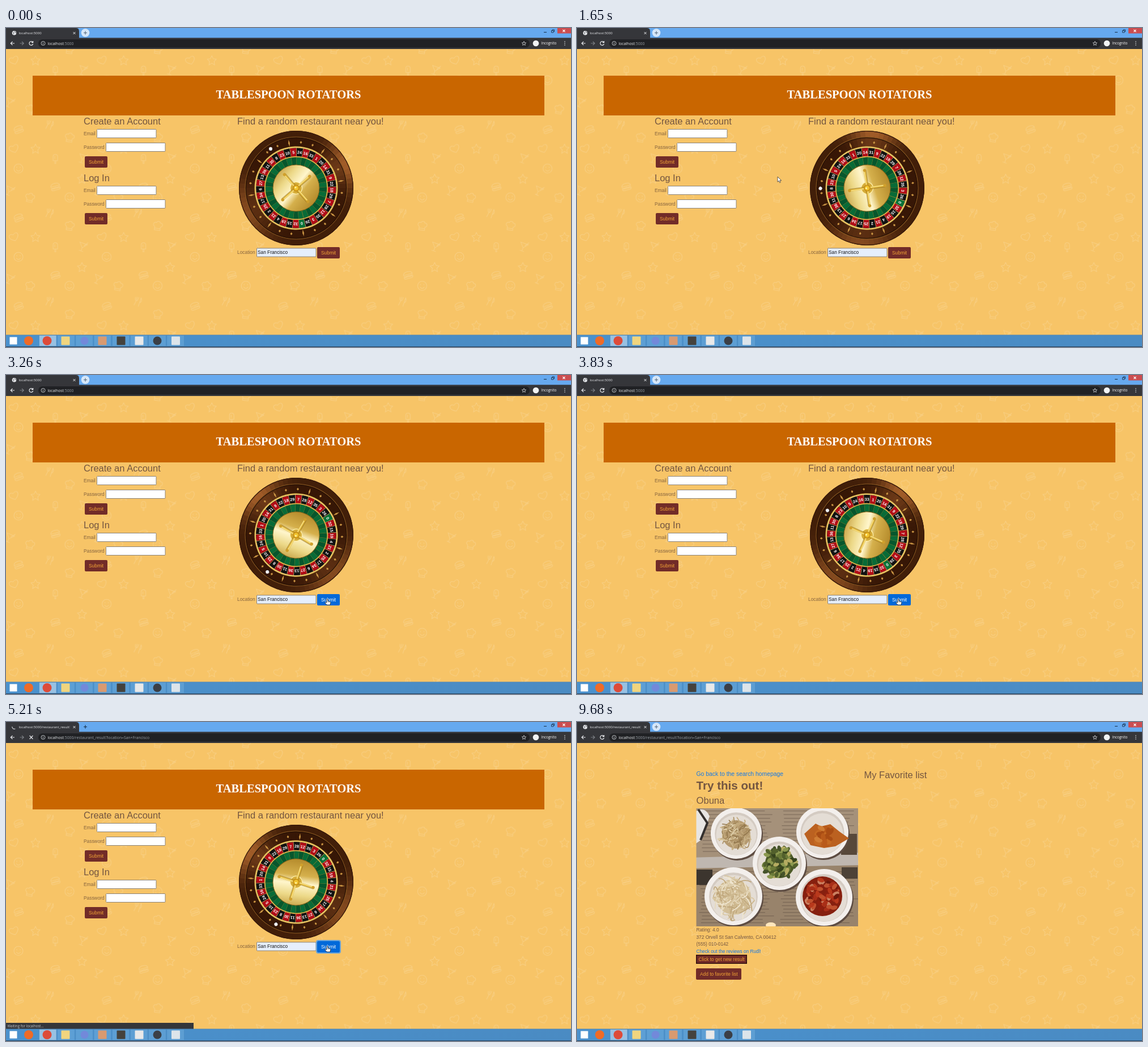
These frames come from a looping animation (997 px wide and 562 px high, 9.78 s). An HTML page:

```html
<!DOCTYPE html>
<html lang="en">
<head>
<meta charset="utf-8">
<title>Restaurant picker</title>
<style>
html, body { margin: 0; width: 100%; height: 100%; overflow: hidden; background: #f7c467; }
svg { display: block; width: 100vw; height: 100vh; }
text { font-family: "Liberation Sans", Arial, sans-serif; white-space: pre; }
.ui { font-family: "Open Sans", "Noto Sans", sans-serif; }
.serif { font-family: "Liberation Serif", "Times New Roman", serif; }
</style>
</head>
<body>
<svg id="stage" viewBox="0 0 997 562" preserveAspectRatio="none"></svg>
<script>
const LOOP = 9780, CX = 512, CY = 282;
const BROWN = '#735540', LABEL = '#86643f', MAROON = '#722c28', AMBER = '#f3a536', LINK = '#1479e8', BLUE = '#0069d9';

// ---------- drawing helpers ----------
const text = (x, y, s, size, fill, extra = '') => `<text x="${x}" y="${y}" font-size="${size}" fill="${fill}" ${extra}>${s}</text>`;
const rect = (x, y, w, h, fill, extra = '') => `<rect x="${x}" y="${y}" width="${w}" height="${h}" fill="${fill}" ${extra}/>`;
const circle = (x, y, r, fill, extra = '') => `<circle cx="${x}" cy="${y}" r="${r}" fill="${fill}" ${extra}/>`;
const line = (d, stroke, w = 1, extra = '') => `<path d="${d}" fill="none" stroke="${stroke}" stroke-width="${w}" ${extra}/>`;
const group = (id, body, extra = '') => `<g id="${id}" ${extra}>${body}</g>`;
const range = n => [...Array(n).keys()];
const polar = (r, deg) => {
  const a = deg * Math.PI / 180;
  return [r * Math.sin(a), -r * Math.cos(a)].map(v => +v.toFixed(2));
};
const wedge = (r0, r1, a0, a1, fill) => {
  const p = [[r1, a0], [r1, a1], [r0, a1], [r0, a0]].map(q => polar(...q));
  return `<path d="M${p[0]}A${r1} ${r1} 0 0 1 ${p[1]}L${p[2]}A${r0} ${r0} 0 0 0 ${p[3]}Z" fill="${fill}"/>`;
};
const field = (x, y, fill = '#fff') => rect(x + .5, y + .5, 104.5, 15, fill, 'stroke="#8d8478" rx="1"');
const button = (x, y, w, label, id) =>
  rect(x, y, w, 20, MAROON, `rx="2" id="${id}"`) + text(x + 7, y + 12.8, label, 8.4, AMBER, `id="${id}Text"`);
let seed = 7;
const rand = () => (seed = seed * 16807 % 2147483647) / 2147483647;
const pick = list => list[rand() * list.length | 0];

// ---------- wallpaper ----------
function wallpaper() {
  const art = {
    heart: 'M0 7C-14-1-7-10 0-4C7-10 14-1 0 7Z',
    star: 'M0-8L2.5-3L8-2L4 2L5 8L0 5L-5 8L-4 2L-8-2L-2.5-3Z',
    face: 'M8 0A8 8 0 1 1-8 0A8 8 0 1 1 8 0M-4 2Q0 7 4 2M-3-3V-1M3-3V-1',
    hat: 'M-5 7V1C-11-2-6-8-3-6C-1-10 4-9 4-6C10-7 9 1 5 1V7ZM-5 4H5',
    fork: 'M-4 8L-2-1M-5-7L-4-2Q-2 0 0-2L1-8M-2-8V-2M4 8L5-8Q9-3 5 1',
    burger: 'M-8-1Q-7-6 0-6Q8-6 8-1ZM-8 1Q-4 3 0 1Q4 3 8 1M-8 3H8Q8 6 5 6H-5Q-8 6-8 3Z',
    drink: 'M-7-6H7L0 2ZM0 2V8M-4 8H4M2-2L7-10',
    pop: 'M-4 3V-4Q-4-8 0-8Q4-8 4-4V3ZM-1 3V8H1V3M-1-5V0'
  };
  const spots = [['heart', 14, 57, -20], ['star', 52, 57, 0], ['face', 22, 92, 0], ['fork', 76, 15, 15],
    ['burger', 87, 124, -15], ['hat', 42, 144, 10], ['drink', 135, 74, 20], ['drink', 6, 131, 25],
    ['face', 112, 143, 0], ['hat', 112, 38, 8], ['star', 134, 110, 0], ['pop', 87, 75, 0],
    ['burger', 22, 23, -20]];
  const icons = spots.map(([k, x, y, a]) => `<path d="${art[k]}" transform="translate(${x} ${y}) rotate(${a})"/>`).join('');
  return `<pattern id="paper" width="155.6" height="155.6" patternUnits="userSpaceOnUse">
    ${rect(0, 0, 156, 156, '#f7c467')}<g fill="none" stroke="#f9d084" stroke-width="1">${icons}</g></pattern>`;
}

// ---------- roulette wheel ----------
function wheel() {
  const order = [0, 32, 15, 19, 4, 21, 2, 25, 17, 34, 6, 27, 13, 36, 11, 30, 8, 23, 10, 5, 24, 16, 33,
    1, 20, 14, 31, 9, 22, 18, 29, 7, 28, 12, 35, 3, 26];
  const step = 360 / 37, first = 170.9;
  const shine = a => {
    const c = Math.cos((a - 64) * Math.PI / 180);
    return c > 0 ? c ** 10 : .7 * c ** 6;
  };
  const wood = (r0, r1, dark, gain) => range(72).map(i => {
    const s = shine(i * 5 + 2.5) * gain;
    return wedge(r0, r1, i * 5, i * 5 + 5.3, `rgb(${dark[0] + 95 * s | 0},${dark[1] + 62 * s | 0},${dark[2] + 32 * s | 0})`);
  }).join('');
  const ring = (r, c, w) => circle(0, 0, r, 'none', `stroke="${c}" stroke-width="${w}"`);
  let s = circle(0, 0, 101, '#2b1206') + wood(89, 100.5, [66, 31, 9], 1) + wood(72, 90, [55, 23, 6], .55);
  s += ring(100.3, '#38190a', 1.2) + ring(90, '#8c5a22', 1) + ring(88.6, '#241005', 1);
  s += circle(0, 0, 73.5, '#e3bd55') + circle(0, 0, 71.3, '#261708');
  order.forEach((n, i) => {
    const a = first + i * step, fill = n ? (i % 2 ? '#b20d17' : '#121212') : '#087238';
    s += wedge(56, 70.5, a - step / 2 + .35, a + step / 2 - .35, fill);
    s += wedge(40, 54.5, a - step / 2, a + step / 2 + .2, i % 2 ? '#06572d' : '#086b37');
    s += line(`M${polar(56, a + step / 2)}L${polar(71, a + step / 2)}`, '#e8cf82', .7);
    s += line(`M${polar(41, a + step / 2)}L${polar(54, a + step / 2)}`, '#a08a32', .7);
    s += text(0, -60.6, n, 7.2, '#fff', `text-anchor="middle" font-weight="bold" transform="rotate(${a})"`);
  });
  s += ring(55.2, '#e0b84c', 1.8) + ring(71.3, '#f0d27a', 1);
  s += circle(0, 0, 41, 'url(#gold)', 'stroke="#80601a" stroke-width="1"');
  range(8).forEach(k => {
    const c = k * 45 - 31.5;
    s += `<path d="M0-86L1.5-80L0-74L-1.5-80Z" fill="#c99443" transform="rotate(${c + 22.5})"/>`;
    [-7.5, 7.5].forEach(d => s += `<path d="M0-83.5L2-81L0-78.5L-2-81Z" fill="#c99443" transform="rotate(${c + d})"/>`);
  });
  s += circle(0, 0, 10.5, '#d5ac3a', 'stroke="#fff0aa" stroke-width="1.2"');
  range(4).forEach(k => {
    s += `<g transform="rotate(${k * 90 - 41})">` +
      line('M1.5 0V-31', '#8a6514', 3, 'stroke-linecap="round" opacity=".55"') +
      line('M0 0V-31', '#e2b93c', 3.6, 'stroke-linecap="round"') +
      line('M-.6-5V-30', '#fff0a8', 1) + circle(0, -31.5, 2.7, '#d0a02c') + '</g>';
  });
  s += circle(0, 0, 6, '#c99217') + circle(0, 0, 4, '#f0c22d') + circle(-1, -1, 1.6, '#fff2a0');
  const [bx, by] = polar(82.4, -33.1);
  return s + circle(bx + .8, by + .8, 3.3, '#1d0d05') + circle(bx, by, 3.1, '#e8e8ec') + circle(bx - .7, by - .8, 1.4, '#fff');
}

// ---------- pages ----------
function form(title, y, id) {
  return text(137, y + 6, title, 16.5, BROWN) + text(137, y + 24.8, 'Email', 8.4, LABEL) + field(160, y + 14) +
    text(137, y + 48.6, 'Password', 8.4, LABEL) + field(176, y + 38) + button(139, y + 62, 40, 'Submit', id);
}

function homePage() {
  return rect(47, 84, 903, 70, '#c96600') +
    text(498.5, 124, 'TABLESPOON ROTATORS', 20.56, '#fff', 'class="serif" font-weight="bold" text-anchor="middle"') +
    form('Create an Account', 164, 'join') + form('Log In', 264, 'login') +
    text(408, 170, 'Find a random restaurant near you!', 16.5, BROWN) +
    group('wheel', wheel()) +
    text(408, 398, 'Location', 8.4, LABEL) + field(442, 387.5, '#e6effd') +
    text(444, 398.3, 'San Francisco', 8.3, '#111') +
    rect(548, 385, 42, 22, 'none', 'id="ring" rx="3" stroke="#6ba4d8" stroke-width="2"') +
    button(549, 386, 40, 'Submit', 'search');
}

function photo() {
  let s = rect(200, 142, 306, 228, '#98836b');
  s += '<path d="M200 142H506V232L200 241Z" fill="#a5917a"/><path d="M200 239L506 230V252L200 258Z" fill="#bfb7b0"/>';
  range(28).forEach(i => {
    const y = i < 12 ? 156 + i * 6.5 : 263 + (i - 12) * 6;
    range(4).forEach(c => s += rect(214 + c * 72 + rand() * 8, y, 38 + rand() * 24, 1.2, '#5d4c40', 'opacity=".5"'));
  });
  s += rect(211, 260, 28, 27, '#3c352e') + rect(466, 197, 28, 37, '#57483a') + rect(467, 256, 28, 20, '#4d4237');
  s += '<path d="M210 157Q226 148 234 166L220 207L210 214Z" fill="#e7e5e3"/><path d="M214 154L230 178L218 208" fill="none" stroke="#34302e" stroke-width="4"/>';

  const bowl = (x, y, r) => circle(x + 2, y + 3, r, '#5d4c42') + circle(x, y, r, '#f3efec') +
    circle(x, y + 1, r * .84, '#d4cbc2') + circle(x, y + 3, r * .79, '#e4ddd5');
  const scatter = (x, y, r, n, draw) => range(n).map(() => {
    const [dx, dy] = polar(r * Math.sqrt(rand()), rand() * 360);
    return draw(x + dx, y + dy);
  }).join('');
  const strands = (x, y, r, base, colors, n, len) => circle(x, y, r, base) + scatter(x, y, r, n, (px, py) => {
    const [ex, ey] = polar(len, rand() * 360), [kx, ky] = polar(len * .6, rand() * 360);
    return line(`M${px - ex / 2} ${py - ey / 2}q${kx} ${ky} ${ex} ${ey}`, pick(colors), 1.7, 'stroke-linecap="round"');
  });
  const chunks = (x, y, r, colors, n, size) => scatter(x, y, r, n, (px, py) =>
    `<ellipse cx="${px}" cy="${py}" rx="${size}" ry="${size * .6}" fill="${pick(colors)}" transform="rotate(${rand() * 180} ${px} ${py})"/>`);

  s += bowl(281, 196, 45) + strands(281, 198, 25, '#b59a70', ['#cdb88f', '#dfcfab', '#94794f', '#c3aa7d', '#a98d60'], 75, 15);
  s += bowl(433, 194, 46) + '<path d="M401 197L421 179L431 184L447 180L463 193L480 205L456 219L436 222L412 217Z" fill="#bb6120"/>' +
    chunks(435, 201, 16, ['#cf7c34', '#a94d14', '#c46a22', '#b95a1a'], 22, 7);
  s += bowl(357, 249, 47) + circle(358, 249, 26, '#4d5a28') +
    chunks(357, 249, 29, ['#52602c', '#6b7a38', '#36431d', '#8b984f', '#45532a', '#b5ac62'], 90, 5.5);
  s += bowl(276, 307, 51) + strands(276, 308, 31, '#d3bf98', ['#e6d9bd', '#f0e6d0', '#bea57a', '#d9c7a2', '#cbb58b'], 80, 26);
  s += bowl(436, 309, 50) + circle(433, 307, 35, '#86200f') +
    chunks(433, 307, 29, ['#a92f18', '#8f1f0f', '#c0512e', '#6d170b', '#b8391c', '#cb8060'], 70, 6);
  s += '<ellipse cx="342" cy="358" rx="9" ry="5" fill="#ffe7bd"/>';
  return `<g clip-path="url(#photoClip)"><g filter="url(#soft)">${s}</g></g>`;
}

function resultPage() {
  return text(210.5, 95, 'Go back to the search homepage', 10.4, LINK) +
    text(210.5, 119, 'Try this out!', 20.6, BROWN, 'font-weight="bold"') +
    text(210.5, 144, 'Obuna', 16.6, BROWN) + text(506.5, 99, 'My Favorite list', 16.5, BROWN) + photo() +
    text(210.5, 369, 'Rating: 4.0', 8.3, BROWN) +
    text(210.5, 381.5, '372 Orvell St San Calvento, CA 00412', 8.3, BROWN) +
    text(210.5, 394, '(555) 010-0142', 8.3, BROWN) +
    text(210.5, 406.5, 'Check out the reviews on Rudl!', 8.25, LINK) +
    rect(210.7, 410.7, 88.6, 14.6, MAROON, 'stroke="#2b0d0c" stroke-width="1.4"') +
    text(214.5, 420.6, 'Click to get new result', 8.3, AMBER) + button(210, 434, 80, 'Add to favorite list', 'add');
}

// ---------- browser and desktop ----------
function browser() {
  const white = '#e8eaed', ui = 'class="ui"';
  return rect(0, 0, 997, 18, '#66a9ef') + '<path d="M0 0H124Q129 0 129 6V18H0Z" fill="#35363a"/>' + rect(0, 17.3, 997, 19.7, '#35363a') +
    rect(57, 20, 867, 14.5, '#202124', 'rx="7.2"') +
    group('globe', circle(14.5, 8.8, 3.8, white) + line('M12 7L14 8.5L13 11M15 5.5L16.5 8L18 9', '#55585d', 1)) +
    line('M14.5 5A4 4 0 0 0 11.5 11', '#d7dade', 1.2, 'id="spinner"') +
    `<g clip-path="url(#tabClip)">${text(22.5, 11, '', 5.95, white, `${ui} id="tabTitle"`)}</g>` +
    line('M118.5 7L122.5 11M122.5 7L118.5 11', white, 1) +
    circle(140, 8.5, 7.3, '#d6e7f9', 'id="plusDisc"') + line('M137 8.5H143M140 5.5V11.5', '#fff', 1.2, 'id="plus"') +
    line('M15 27H8.5M11.5 23.8L8.3 27L11.5 30.2', white, 1.2) + line('M24.5 27H31M28 23.8L31.2 27L28 30.2', '#7d8085', 1.2) +
    line('M47 24.8A3.4 3.4 0 1 0 47.7 28M47.7 23V25.6H45', white, 1.2, 'id="reload"') +
    line('M41.6 24L47.4 30M47.4 24L41.6 30', white, 1.2, 'id="stop"') +
    circle(65.5, 27, 3.5, 'none', 'stroke="#cfd2d6" stroke-width=".9"') + line('M65.5 26.5V29M65.5 24.9V25.7', '#cfd2d6', .9) +
    `<text x="73.5" y="29.5" font-size="6.8" fill="#e8eaed" ${ui}>localhost<tspan id="url" fill="#9aa0a6"></tspan></text>` +
    '<path d="M914 23.5L915 26L917.7 26.1L915.6 27.8L916.3 30.4L914 29L911.7 30.4L912.4 27.8L910.3 26.1L913 26Z" fill="none" stroke="#dadce0" stroke-width=".8"/>' +
    circle(935, 27, 5.3, '#f1f3f4') + text(944.5, 29.2, 'Incognito', 6.2, '#fff', ui) +
    [24, 27, 30].map(y => circle(986, y, .8, white)).join('') +
    line('M949 7.5H954', '#1c3550', 1.1) + line('M962.5 4.5H966V8H962.5ZM964 4V3H967.5V6.5H966.5', '#1c3550', .9) +
    rect(973, 0, 24, 9.5, '#cb4d50') + line('M982.5 3L986.5 7M986.5 3L982.5 7', '#fff', 1.1);
}

function taskbar() {
  const square = (x, c) => rect(x - 7.5, 543.5, 15, 15, c, 'rx="1"');
  let s = rect(0, 541, 997, 21, 'url(#bar)') + rect(0, 540.5, 997, .8, '#4f86b3') + rect(0, 561, 997, 1, '#24425e');
  range(8).forEach(i => s += rect(58.5 + i * 32.2, 541.5, 30.5, 19, i ? '#76b2e0' : '#c2dcef', `opacity="${i ? .45 : .65}" stroke="#4a83b5" stroke-width=".6"`));
  return s + rect(6.5, 544.5, 13, 13, '#fff') + circle(40, 551, 8, '#ef6b27') + circle(72.5, 551, 8, '#dd4b39') +
    square(105, '#f1d57e') + circle(138.5, 551, 7, '#7289da') + square(170, '#d99a70') + square(203, '#45423d') +
    square(235, '#e9e9e9') + circle(267, 551, 7.5, '#3b3f46') + square(299.5, '#dce4ea');
}

const arrow = '<path d="M0 0V9.2L2.2 7.2L3.7 10.5L5.2 9.8L3.8 6.7H6.7Z" fill="#fff" stroke="#222" stroke-width=".7"/>';
const hand = '<path d="M-1 .8Q0-.6 1 .8V4L5 5Q6 5.4 5.7 7L5 10.5H-1L-4 6.8Q-3.6 5-1.2 6.6Z" fill="#fff" stroke="#222" stroke-width=".8"/>' +
  line('M1 4V6.4M3 4.6V6.6', '#444', .5);

const stage = document.getElementById('stage');
stage.innerHTML = `<defs>${wallpaper()}
  <linearGradient id="gold" x1="0" y1=".1" x2="1" y2=".9"><stop offset="0" stop-color="#b98e2e"/><stop offset=".28" stop-color="#ecd887"/>
    <stop offset=".48" stop-color="#fff6cc"/><stop offset=".62" stop-color="#d5b04c"/><stop offset="1" stop-color="#a87c1e"/></linearGradient>
  <linearGradient id="bar" x1="0" y1="0" x2="1" y2="0"><stop offset="0" stop-color="#4a91cd"/><stop offset="1" stop-color="#4a8bc3"/></linearGradient>
  <filter id="soft"><feGaussianBlur stdDeviation=".7"/></filter>
  <clipPath id="tabClip">${rect(20, 0, 93, 18, '#fff')}</clipPath>
  <clipPath id="photoClip">${rect(210.5, 152, 285.5, 208, '#fff')}</clipPath></defs>
  ${rect(0, 37, 997, 504, 'url(#paper)')}${group('home', homePage())}${group('result', resultPage())}
  ${group('status', rect(0, 530, 331, 11, '#35363a') + text(2.5, 537.8, '', 6.2, '#c5c8cc', 'class="ui" id="statusText"'))}
  ${browser()}${taskbar()}${group('cursor', group('arrow', arrow) + group('hand', hand))}`;

// ---------- timeline ----------
const steps = [[0, 0, 1], [150, 150, 1], [370, 1250, 11], [1360, 1650, 4], [1740, 2310, 7], [2400, 3260, 10],
  [3350, 3350, 1], [3450, 4320, 10], [4440, 4440, 1], [4550, 4890, 5], [5050, 5210, 3], [5320, 5560, 4],
  [5750, 5850, 2], [7250, 7740, 6], [7880, 7910, 2], [8720, 9080, 5], [9680, 9680, 1]]
  .flatMap(([a, b, n]) => range(n).map(i => n > 1 ? Math.round(a + (b - a) * i / (n - 1)) : a));
const spin = [[0, 0], [1650, 302.7], [3260, 611.1], [4440, 817], [5210, 958.7], [5600, 1030]];
const moves = [[150, 62, 547], [370, 52, 505], [700, 95, 425], [1250, 279, 302], [1650, 354, 262], [2000, 425, 345],
  [2310, 510, 434], [2650, 545, 430], [3100, 567, 394.5], [7240, 567, 394.5], [7250, 551, 398.5], [7740, 324, 451],
  [7880, 316, 448], [7910, 309, 447], [8710, 309, 447], [8720, 290, 443], [8990, 180, 436]];

function along(keys, t) {
  const i = keys.findIndex(k => k[0] > t);
  if (i === 0) return keys[0].slice(1);
  if (i < 0) return keys[keys.length - 1].slice(1);
  const a = keys[i - 1], b = keys[i], f = (t - a[0]) / (b[0] - a[0]);
  return a.slice(1).map((v, k) => v + (b[k + 1] - v) * f);
}

const el = Object.fromEntries([...stage.querySelectorAll('[id]')].map(e => [e.id, e]));
const show = (id, on) => el[id].setAttribute('display', on ? 'inline' : 'none');
const attr = (id, name, v) => el[id].setAttribute(name, v);
const paint = (id, on) => {
  attr(id, 'fill', on ? BLUE : MAROON);
  attr(id + 'Text', 'fill', on ? '#fff' : AMBER);
};

function render(time) {
  const t = steps.filter(s => s <= time).pop();
  const clicked = t >= 3920, loading = clicked && t < 5560, moved = t >= 4720, done = t >= 5480;
  show('home', !done);
  show('result', done);
  attr('wheel', 'transform', `translate(${CX} ${CY}) rotate(${along(spin, t)[0]})`);

  const [x, y] = along(moves, t);
  const over = (bx, by, w) => x >= bx && x <= bx + w && y >= by && y <= by + 20;
  const onSearch = !done && over(549, 386, 40), onAdd = done && t < 9080 && over(210, 434, 80);
  paint('search', onSearch);
  paint('add', onAdd);
  show('ring', clicked);
  const pointing = onSearch || onAdd || (done && t < 7300);
  show('cursor', t >= 150 && t < 9080);
  attr('cursor', 'transform', `translate(${x} ${y})`);
  show('hand', pointing);
  show('arrow', !pointing);

  show('globe', !loading);
  show('spinner', loading);
  attr('spinner', 'transform', `rotate(${(t - 4440) * (moved ? .36 : -.36)} 14.5 8.8)`);
  show('reload', !loading);
  show('stop', loading);
  const idle = !clicked || t >= 9680;
  show('plusDisc', idle);
  attr('plus', 'stroke', idle ? '#5b6d80' : '#17324d');
  const path = ':5000' + (moved ? '/restaurant_result?location=San+Francisco' : '');
  el.url.textContent = path;
  el.tabTitle.textContent = 'localhost' + path;
  show('status', t >= 4010 && t < 5850);
  attr('status', 'opacity', t >= 5750 ? .5 : 1);
  el.statusText.textContent = t < 4630 ? 'Connecting...' : 'Waiting for localhost...';
}

const start = performance.now();
function tick() {
  render((performance.now() - start) % LOOP);
  requestAnimationFrame(tick);
}
tick();
</script>
</body>
</html>
```
